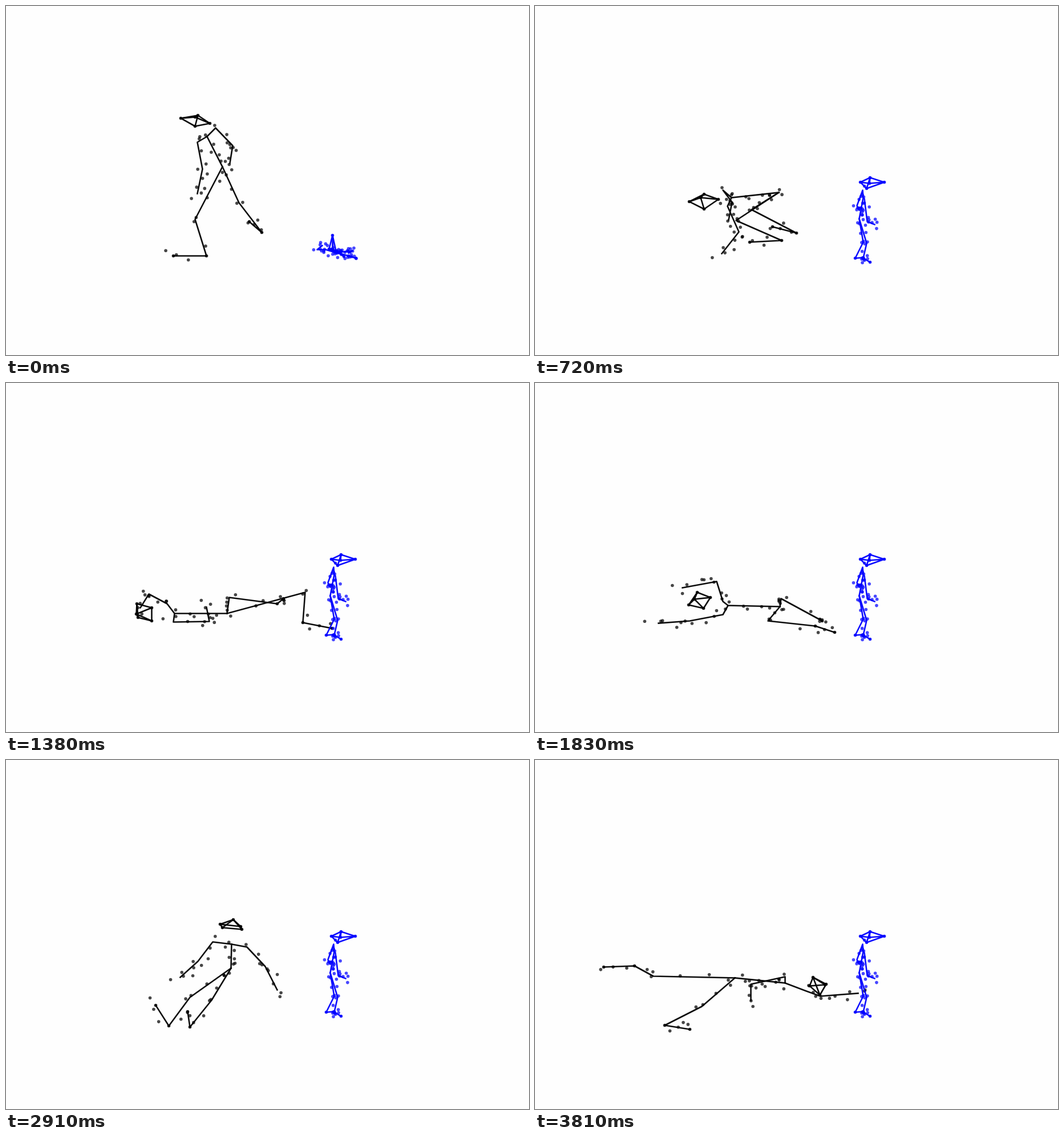
These frames come from a looping animation (917x611 px, 3840 ms). An HTML page with a canvas:

```html
<!DOCTYPE html>
<html lang="en">
<head>
<meta charset="utf-8">
<title>Two moving figures</title>
<style>
html, body { margin: 0; width: 100%; height: 100%; overflow: hidden; background: #fefefe; }
canvas { display: block; }
</style>
</head>
<body>
<canvas id="stage" width="917" height="611"></canvas>
<script>
const LOOP = 3840, STEP = 30;
const ctx = document.getElementById('stage').getContext('2d');

// Joint numbers: head 0-4 (ring, then apex), neck and pelvis,
// arms as shoulder-elbow-wrist, legs as knee-ankle-toe.
const NECK = 5, PELVIS = 6;
const ARMS = [[7, 8, 9], [10, 11, 12]];
const LEGS = [[13, 14, 15], [16, 17, 18]];
const CHAINS = [
  [0, 1, 2, 3, 0], [0, 4, 2], [1, 4, 3], [NECK, PELVIS],
  [...ARMS[0]].reverse().concat(NECK, ARMS[1]),
  ...LEGS.map(leg => [PELVIS, ...leg])
];
const KNOBS = [0, 1, 2, 3, 4, ...LEGS.flatMap(leg => leg.slice(1))];

const pose = (time, ...parts) => ({ time, joints: parts.flat() });

// Key poses: head, neck and pelvis, two arms, two legs.
const black = { color: '#000', spread: 11, poses: [
  pose(0, [306,196, 331,194, 357,205, 331,210, 336,191], [352,228, 379,281],
    [335,238, 344,285, 335,328], [367,213, 397,244, 392,275],
    [408,344, 448,396, 426,377], [331,373, 351,437, 293,437]),
  pose(720, [270,342, 296,329, 321,338, 296,355, 290,335], [344,335, 427,326],
    [337,350, 357,395, 327,433], [329,322, 345,343, 339,374],
    [379,356, 458,397, 416,386], [352,375, 432,410, 376,413]),
  pose(1380, [231,410, 229,386, 255,393, 255,416, 228,404], [295,403, 387,403],
    [293,418, 356,417, 351,392], [282,386, 250,369, 235,393],
    [391,375, 475,386, 486,377], [524,366, 520,419, 571,429]),
  pose(1830, [269,388, 284,366, 307,375, 295,394, 279,378], [338,389, 429,391],
    [329,405, 271,416, 216,420], [329,382, 318,347, 258,358],
    [431,377, 503,416, 499,413], [408,416, 491,425, 525,436]),
  pose(2340, [315,323, 342,326, 365,330, 339,330, 343,315], [363,351, 450,374],
    [352,354, 327,378, 282,379], [359,346, 343,379, 296,396],
    [369,389, 440,429, 397,431], [409,440, 413,485, 359,485]),
  pose(2910, [375,287, 411,291, 413,296, 379,293, 398,279], [395,322, 394,364],
    [362,318, 336,352, 305,380], [422,327, 454,361, 475,402],
    [360,420, 322,467, 318,440], [322,415, 285,465, 262,429]),
  pose(3810, [481,395, 508,393, 510,392, 499,411, 487,380], [438,390, 350,381],
    [475,404, 500,413, 566,408], [438,379, 378,392, 378,420],
    [207,378, 174,360, 120,362], [292,431, 227,464, 271,471])
] };

const blue = { color: '#00f', spread: 8, poses: [
  pose(0, [566,425, 572,425, 578,428, 573,428, 572,401], [573,430, 578,430],
    [560,426, 545,426, 554,419], [590,430, 607,428, 600,432],
    [590,434, 613,441, 600,437], [585,432, 592,438, 580,430]),
  pose(540, [570,308, 586,310, 612,308, 581,319, 587,300], [575,335, 568,372],
    [574,322, 564,349, 568,357], [577,337, 582,377, 595,382],
    [575,413, 561,441, 575,440], [581,415, 575,441, 587,448])
] };

let seed = 7;
const random = () => (seed = seed * 16807 % 2147483647) / 2147483647;
const jitter = () => random() * 2 - 1;

// Loose markers spread evenly from `start` to `end` along a bone, shifted at random.
const strew = (from, to, count, start, end) => Array.from({ length: count }, (_, i) => ({
  from, to, along: start + (end - start) * i / (count - 1), dx: jitter(), dy: jitter()
}));
const markers = [
  ...strew(NECK, PELVIS, 8, -0.1, 1.1),
  ...ARMS.flatMap(([shoulder, elbow, wrist]) => [
    ...strew(shoulder, elbow, 4, 0, 1),
    ...strew(elbow, wrist, 6, 0.1, 1.3)
  ]),
  ...LEGS.flatMap(([knee, ankle, toe]) => [
    ...strew(PELVIS, knee, 3, 0.3, 1),
    ...strew(knee, ankle, 2, 0.1, 0.6),
    ...strew(ankle, toe, 3, 0.4, 1.1)
  ])
];

// Cubic Hermite blend through the key poses, returned as [x, y] pairs.
function sample(poses, time) {
  const last = poses.length - 1;
  const t = Math.min(time, poses[last].time);
  let i = 0;
  while (i < last - 1 && t >= poses[i + 1].time) i++;
  const span = poses[i + 1].time - poses[i].time;
  const u = (t - poses[i].time) / span, v = 1 - u;
  const slope = (k, n) => {
    const a = poses[Math.max(k - 1, 0)], b = poses[Math.min(k + 1, last)];
    return (b.joints[n] - a.joints[n]) / (b.time - a.time) * span;
  };
  const flat = poses[i].joints.map((p, n) =>
    v * v * (1 + 2 * u) * p + u * v * v * slope(i, n)
    + u * u * (3 - 2 * u) * poses[i + 1].joints[n] - u * u * v * slope(i + 1, n));
  return Array.from({ length: flat.length / 2 }, (_, n) => [flat[2 * n], flat[2 * n + 1]]);
}

function dot(x, y, alpha) {
  ctx.globalAlpha = alpha;
  ctx.beginPath();
  ctx.arc(x, y, 2.8, 0, Math.PI * 2);
  ctx.fill();
}

function drawFigure({ color, spread, poses }, time) {
  const joints = sample(poses, time);
  ctx.fillStyle = ctx.strokeStyle = color;
  for (const { from, to, along, dx, dy } of markers) {
    const [ax, ay] = joints[from], [bx, by] = joints[to];
    dot(ax + (bx - ax) * along + dx * spread, ay + (by - ay) * along + dy * spread, 0.72);
  }
  ctx.globalAlpha = 0.95;
  for (const chain of CHAINS) {
    ctx.beginPath();
    chain.forEach(j => ctx.lineTo(...joints[j]));
    ctx.stroke();
  }
  KNOBS.forEach(j => dot(...joints[j], 0.85));
  ctx.globalAlpha = 1;
}

ctx.lineWidth = 2.6;
ctx.lineJoin = 'round';
ctx.lineCap = 'square';
ctx.translate(0.5, 0.5);

const start = performance.now();
function draw() {
  const elapsed = (performance.now() - start) % LOOP;
  const time = Math.floor(elapsed / STEP) * STEP;
  ctx.fillStyle = '#fefefe';
  ctx.fillRect(-1, -1, 919, 613);
  drawFigure(black, time);
  drawFigure(blue, time);
  requestAnimationFrame(draw);
}
draw();
</script>
</body>
</html>
```
